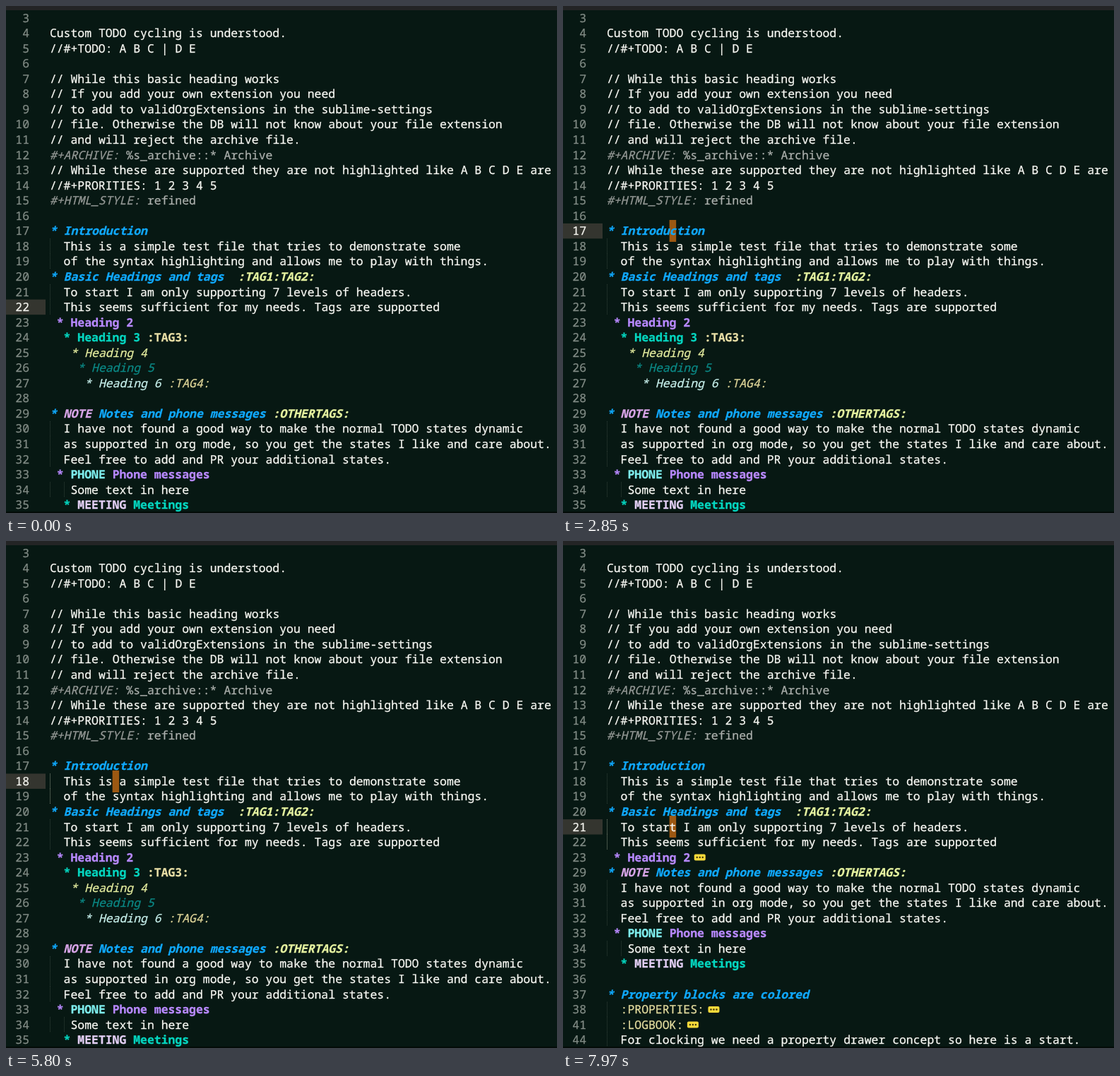
Recreate the animation shown at these times as an HTML page. Size 780 by 718 pixels, loop 8 s.

```html
<!DOCTYPE html>
<html lang="en">
<head>
<meta charset="utf-8">
<title>Org folding</title>
<style>
html, body { margin: 0; width: 100%; height: 100%; overflow: hidden; background: #071813; }
svg { display: block; width: 780px; height: 718px; }
text { font: 16.43px "Noto Sans Mono", "DejaVu Sans Mono", monospace; text-rendering: geometricPrecision; color: #fafaf5; }
text, tspan { fill: currentColor; stroke: currentColor; stroke-width: .25px; }
.num { color: #828c86; }
.on .num { color: #f4f4ee; }
.key { color: #959996; font-style: italic; }
.val { color: #acb0ad; }
.h1 { color: #10a9ff; font-weight: bold; font-style: italic; }
.h2 { color: #b889ff; font-weight: bold; }
.h3 { color: #05d6c0; font-weight: bold; }
.h4 { color: #e6eea0; font-style: italic; }
.h5 { color: #0b8986; font-style: italic; }
.h6 { color: #c9f2ee; font-style: italic; }
.tag1 { color: #e6f3a0; font-weight: bold; font-style: italic; }
.tag3 { color: #e9dfa6; font-weight: bold; }
.tag6 { color: #e0d699; font-style: italic; }
.note { color: #d8a5e8; font-weight: bold; font-style: italic; }
.phone { color: #7eecec; font-weight: bold; }
.meet { color: #e4d0f6; font-weight: bold; }
.prop { color: #e6dea0; }
.guide { stroke: #33433b; stroke-dasharray: 1 1; }
.lit .guide { stroke: #87907f; }
#mouse { mix-blend-mode: difference; fill: none; stroke: #fff; stroke-width: 2; }
</style>
</head>
<body>
<svg viewBox="0 0 780 718">
  <rect width="780" height="718" fill="#071813"/>
  <rect id="gutter" width="56" height="21.5" fill="#34352f"/>
  <rect id="caret" width="9.5" height="31" fill="#9c5812"/>
  <g id="rows"></g>
  <rect width="780" height="6" fill="#232425"/>
  <rect y="716" width="780" height="2" fill="#030b08"/>
  <circle id="press" cx="151.5" cy="311.5" r="14" fill="#ffff00" fill-opacity=".45"/>
  <path id="mouse" d="M-5-9h4m2 0h4M0-8v17M-5 10h4m2 0h4"/>
</svg>
<script>
const LEFT = 61.9, CHAR = 9.86, TOP = 17, PITCH = 21.55, LOOP = 8000;
const $ = id => document.getElementById(id);

// line number, then class and text in pairs
const LINES = [
  [3],
  [4, '', 'Custom TODO cycling is understood.'],
  [5, '', '//#+TODO: A B C | D E'],
  [6],
  [7, '', '// While this basic heading works'],
  [8, '', '// If you add your own extension you need'],
  [9, '', '// to add to validOrgExtensions in the sublime-settings'],
  [10, '', '// file. Otherwise the DB will not know about your file extension'],
  [11, '', '// and will reject the archive file.'],
  [12, 'key', '#+ARCHIVE:', 'val', ' %s_archive::* Archive'],
  [13, '', '// While these are supported they are not highlighted like A B C D E are'],
  [14, '', '//#+PRORITIES: 1 2 3 4 5'],
  [15, 'key', '#+HTML_STYLE:', 'val', ' refined'],
  [16],
  [17, 'h1', '* Introduction'],
  [18, '', '  This is a simple test file that tries to demonstrate some'],
  [19, '', '  of the syntax highlighting and allows me to play with things.'],
  [20, 'h1', '* Basic Headings and tags  ', 'tag1', ':TAG1:TAG2:'],
  [21, '', '  To start I am only supporting 7 levels of headers.'],
  [22, '', '  This seems sufficient for my needs. Tags are supported'],
  [23, 'h2', ' * Heading 2'],
  [24, 'h3', '  * Heading 3 ', 'tag3', ':TAG3:'],
  [25, 'h4', '   * Heading 4'],
  [26, 'h5', '    * Heading 5'],
  [27, 'h6', '     * Heading 6 ', 'tag6', ':TAG4:'],
  [28],
  [29, 'h1', '* ', 'note', 'NOTE', 'h1', ' Notes and phone messages ', 'tag1', ':OTHERTAGS:'],
  [30, '', '  I have not found a good way to make the normal TODO states dynamic'],
  [31, '', '  as supported in org mode, so you get the states I like and care about.'],
  [32, '', '  Feel free to add and PR your additional states.'],
  [33, 'h2', ' * ', 'phone', 'PHONE', 'h2', ' Phone messages'],
  [34, '', '   Some text in here'],
  [35, 'h3', '  * ', 'meet', 'MEETING', 'h3', ' Meetings'],
  [36],
  [37, 'h1', '* Property blocks are colored'],
  [38, 'prop', '  :PROPERTIES:'],
  [41, 'prop', '  :LOGBOOK:'],
  [44, '', '  For clocking we need a property drawer concept so here is a start.'],
  [45],
  [46, 'h1', '* ', 'note', 'NOTE', 'h1', ' orgmode (vs true orgmode compat) bits'],
  [47, '', '  These items are NOT true org mode things but come']
];
const GUIDES = { 34: [0, 2] };
[18, 19, 21, 22, 30, 31, 32, 38, 41, 44, 47].forEach(n => GUIDES[n] = [0]);

// last hidden line for each folded heading
const FOLD_END = { 17: 19, 20: 28, 23: 28 };

// time, current line, folded heading, first and last line with a lit guide
const STEPS = [
  [0, 22, 0],
  [1380, 17, 0],
  [2390, 17, 17],
  [2850, 17, 0],
  [3710, 17, 17],
  [4170, 17, 0],
  [5800, 18, 0, 18, 19],
  [6030, 19, 0, 18, 19],
  [6180, 20, 0],
  [6660, 20, 20],
  [7510, 20, 23],
  [7970, 21, 23, 21, 22]
];

// time, x, y of the pointer; no position means hidden
const POINTER = [
  [0], [320, 597, 636], [380, 349, 204],
  [610, 345, 201], [687, 334, 199], [764, 314, 203], [841, 286, 213],
  [918, 254, 229], [995, 222, 250], [1072, 194, 273], [1149, 172, 293],
  [1226, 159, 306], [1303, 154, 312],
  [2390], [6660, 154, 312], [7510]
];

const at = (table, t) => table.findLast(step => step[0] <= t);
const colX = col => LEFT + col * CHAR;
const show = (el, on) => el.style.display = on ? '' : 'none';

function marker(x) {
  const dots = [4, 8, 12].map(d => `<circle cx="${x + d}" cy="0" r="1.2" fill="#3c350c"/>`).join('');
  return `<g class="fold"><rect x="${x}" y="-4.5" width="16" height="9" rx="2" fill="#f6d93a"/>${dots}</g>`;
}

function makeRow([n, ...parts]) {
  let col = 0, words = '';
  for (let i = 0; i < parts.length; i += 2) {
    for (const m of parts[i + 1].matchAll(/\S+/g))
      words += `<tspan class="${parts[i]}" x="${colX(col + m.index)}">${m[0]}</tspan>`;
    col += parts[i + 1].length;
  }
  const guides = (GUIDES[n] || []).map(c =>
    `<path class="guide" d="M${Math.round(colX(c)) + .5}-10.8v21.5"/>`).join('');
  const g = document.createElementNS('http://www.w3.org/2000/svg', 'g');
  g.innerHTML = `${guides}<text class="num" x="33" y="5.6" text-anchor="end">${n}</text>` +
    `<text y="5.6">${words}</text>` +
    (FOLD_END[n] || n === 38 || n === 41 ? marker(colX(col) + 5.5) : '');
  $('rows').append(g);
  return { n, g, fold: g.querySelector('.fold') };
}
const rows = LINES.map(makeRow);

function layout([, line, fold, litFrom, litTo]) {
  let i = 0;
  for (const { n, g, fold: mark } of rows) {
    const hidden = fold && n > fold && n <= FOLD_END[fold];
    const y = TOP + PITCH * i;
    show(g, !hidden && y < 718);
    if (hidden) continue;
    g.setAttribute('transform', `translate(0 ${y})`);
    g.classList.toggle('on', n === line);
    g.classList.toggle('lit', n >= litFrom && n <= litTo);
    if (mark && FOLD_END[n]) show(mark, n === fold);
    if (n === line) {
      $('gutter').setAttribute('y', y - 10.8);
      $('caret').setAttribute('x', colX(9));
      $('caret').setAttribute('y', Math.round(y - 15.5));
    }
    i++;
  }
  show($('caret'), line !== 22);
}

const start = performance.now();
let current;
function frame() {
  const t = (performance.now() - start) % LOOP;
  const step = at(STEPS, t);
  if (step !== current) layout(current = step);
  const [, x, y] = at(POINTER, t);
  show($('mouse'), x !== undefined);
  if (x !== undefined) $('mouse').setAttribute('transform', `translate(${x} ${y})`);
  show($('press'), t >= 1380 && t < 1470);
  requestAnimationFrame(frame);
}
frame();
</script>
</body>
</html>
```
